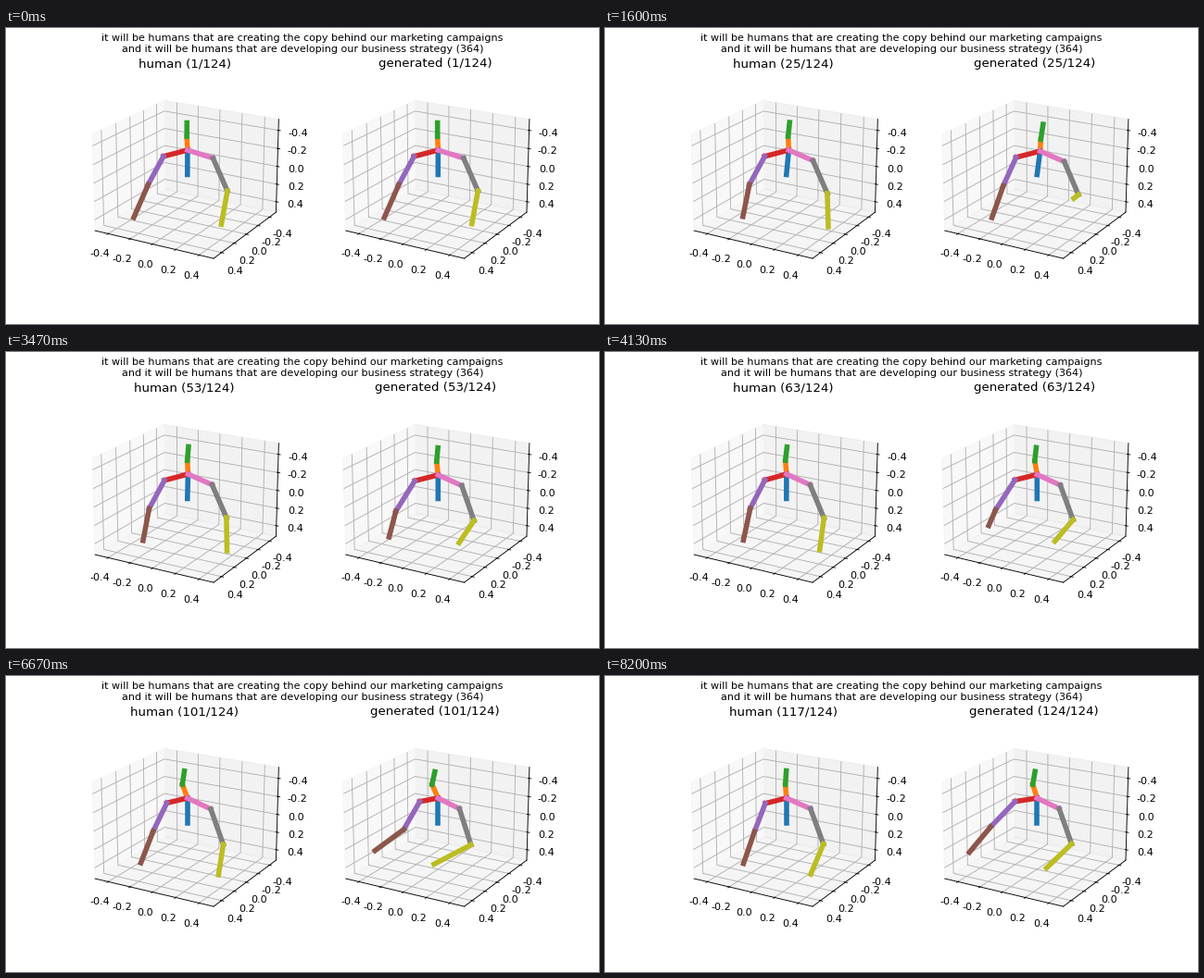
Write a matplotlib script that moves like this. It is 640 px wide and 320 px high and loops after 8270 ms.

```python
import math
import matplotlib.pyplot as plt
from matplotlib.animation import FuncAnimation

W, H, DPI = 640, 320, 80
LOOP_MS, COUNT = 8270, 124
TICKS = COUNT + 1  # the last pose holds for one extra tick
LIMIT = 0.5 * 25 / 24

plt.rcParams["font.family"] = "DejaVu Sans"
plt.rcParams["axes.unicode_minus"] = False

CAPTION = ("it will be humans that are creating the copy behind our marketing campaigns\n"
           "and it will be humans that are developing our business strategy (364)")

# Bone: (parent, rest vector in pixels as x + yj, y down)
BONES = {
    "spine": (None, -26.5j),
    "neck": ("spine", -0.7 - 14.8j),
    "head": ("neck", 1 - 14.7j),
    "collar_r": ("spine", -26 + 6.8j),
    "upper_r": ("collar_r", -16.5 + 30.5j),
    "fore_r": ("upper_r", -6.5 + 34.5j),
    "collar_l": ("spine", 26 + 11.5j),
    "upper_l": ("collar_l", 15.5 + 35.5j),
    "fore_l": ("upper_l", 1.5 + 36j),
}


def gesture(at, spread, **shifts):
    """A swing that peaks at one step and bends each bone by its shift."""
    return at, spread, shifts


OPENING = gesture(0, 14, fore_r=-9 + 1j, collar_l=1.5 - 2.8j, fore_l=-8, head=-1)

HUMAN = [
    OPENING,
    gesture(31, 17, spine=3, head=0.8 - 0.5j),
    gesture(64, 10, fore_l=-3, collar_r=2),
    gesture(82, 13, neck=-5.5, head=7.5 + 2j, collar_r=7 - 3j, upper_r=8 + 1j,
            fore_r=-9 - 3j, collar_l=-5.5 + 2j, upper_l=-6 + 4j, fore_l=-34 - 19j),
    gesture(98, 12, neck=-4, collar_r=2.5 - 1j, fore_r=-5, upper_l=-1 + 2j),
    gesture(118, 12, collar_r=3 - 1j, upper_r=5, fore_r=-5,
            upper_l=-1.5 + 2.5j, fore_l=-15.5 - 3.5j),
]

GENERATED = [
    OPENING,
    gesture(24, 12, spine=3.3 + 1j, neck=1.5 + 2j, head=1.5 - 1.5j,
            upper_r=3, fore_r=-5, fore_l=-4.5 - 31j),
    gesture(48, 16, spine=1j, upper_r=-3 + 2j, upper_l=-2 + 2j, fore_l=-11 - 9j),
    gesture(64, 12, upper_r=-3 + 1j, fore_r=7 - 14j, fore_l=-3.5 - 4j),
    gesture(82, 13, neck=-2, collar_r=3, fore_r=-10.5 - 12j, fore_l=-10 - 7.5j),
    gesture(102, 36, neck=-5.5, head=2 + 1j, collar_r=6 - 3j, fore_r=-23 - 10j,
            collar_l=-3, upper_l=-3 + 3.5j, fore_l=-40 - 14j),
    gesture(122, 14, collar_r=-2 - 1j, upper_r=-10 - 3j),
]

fig = plt.figure(figsize=(W / DPI, H / DPI), dpi=DPI)
fig.suptitle(CAPTION, fontsize=10)


def make_room(slot):
    ax = fig.add_subplot(1, 2, slot, projection="3d")
    ax.view_init(elev=20, azim=-60)
    ax.set_xlim(-LIMIT, LIMIT)
    ax.set_ylim(LIMIT, -LIMIT)
    ax.set_zlim(LIMIT, -LIMIT)
    return ax


def pose(pelvis, gestures, step):
    joints = {None: pelvis}
    weights = [(math.exp(-((step - at) / spread) ** 2), shifts)
               for at, spread, shifts in gestures]
    for name, (parent, rest) in BONES.items():
        bend = sum(w * shifts.get(name, 0) for w, shifts in weights)
        joints[name] = joints[parent] + rest + bend
    return joints


class Skeleton:
    def __init__(self, name, slot, pelvis, gestures, length):
        self.name, self.pelvis = name, pelvis
        self.gestures, self.length = gestures, length
        self.room = make_room(slot)

    def build(self, stage):
        self.lines = {bone: stage.plot([], [], lw=5, color=f"C{k}")[0]
                      for k, bone in enumerate(BONES)}

    def show(self, i):
        step = min(i, self.length - 1)
        self.room.set_title(f"{self.name} ({step + 1}/{COUNT})")
        joints = pose(self.pelvis, self.gestures, step)
        for bone, line in self.lines.items():
            a, b = joints[BONES[bone][0]], joints[bone]
            line.set_data([a.real, b.real], [a.imag, b.imag])


skeletons = [
    Skeleton("human", 1, 195.8 + 158.5j, HUMAN, 117),
    Skeleton("generated", 2, 466.3 + 158.5j, GENERATED, COUNT),
]

# Overlay in pixel coordinates for the bones
stage = fig.add_axes([0, 0, 1, 1], zorder=5)
stage.axis("off")
for s in skeletons:
    s.build(stage)
stage.set(xlim=(0, W), ylim=(H, 0))


def update(i):
    for s in skeletons:
        s.show(i)
    return []


anim = FuncAnimation(fig, update, frames=TICKS, interval=LOOP_MS / TICKS,
                     repeat=True, repeat_delay=0, blit=False)
plt.show()
```
